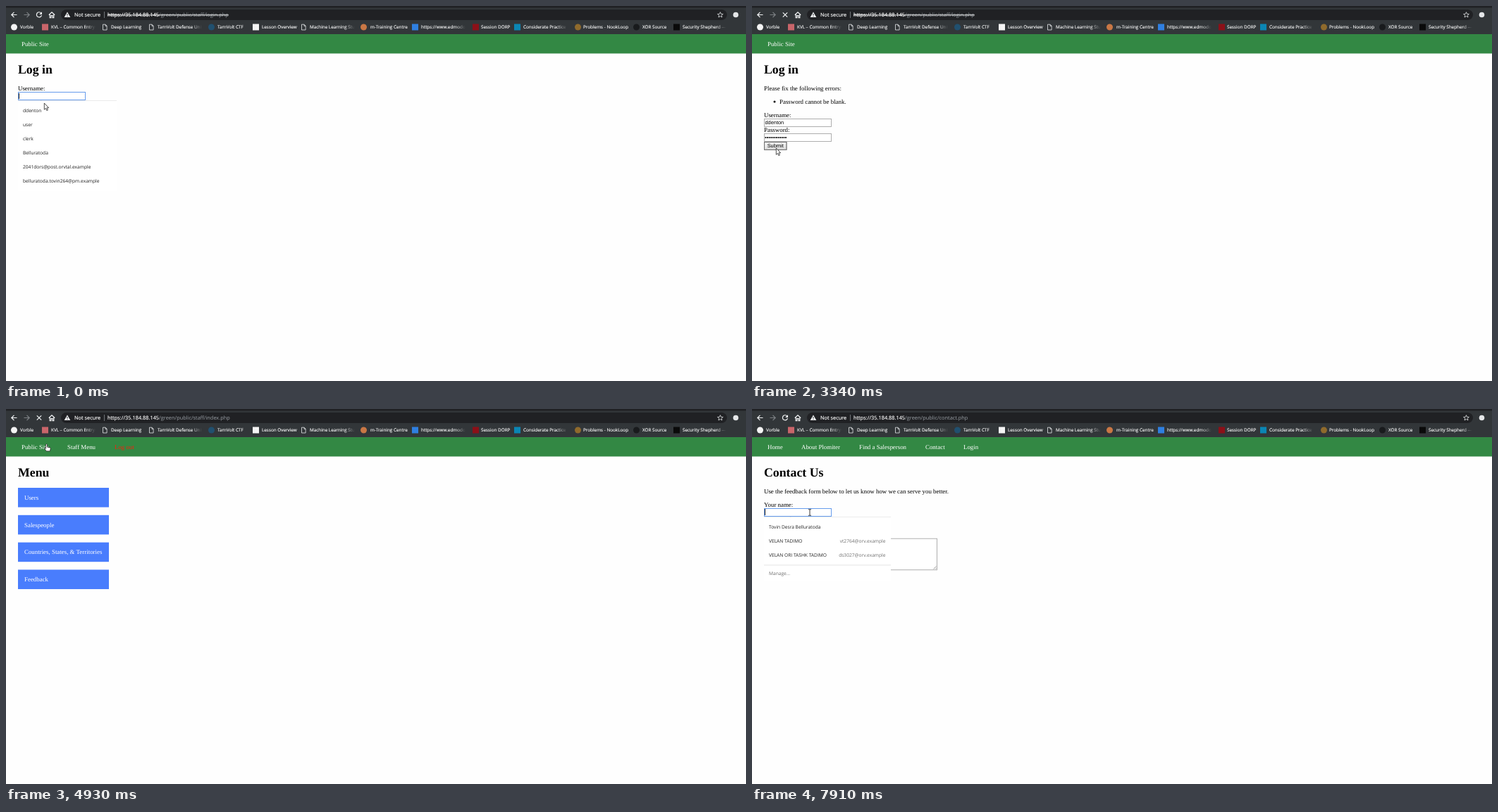
These frames come from a looping animation (1050x533 px, 8000 ms). An HTML page:

```html
<!DOCTYPE html>
<html lang="en">
<head>
<meta charset="utf-8">
<title>Login walkthrough</title>
<style>
  html, body { margin: 0; width: 100%; height: 100%; overflow: hidden; background: #fefefe; }
  svg { display: block; }
  text { white-space: pre; text-rendering: geometricPrecision; }
  .body { font: 8.88px "Liberation Serif", serif; }
  .nav { font: 8.88px "Liberation Serif", serif; fill: #fff; }
  .head { font: bold 17.78px "Liberation Serif", serif; }
  .field { font: 7.4px "Liberation Sans", sans-serif; }
  .mark { font: 6.35px "Open Sans", sans-serif; fill: #fff; stroke: #fff; stroke-width: .12; }
  .bar { font: 7.37px "Open Sans", sans-serif; fill: #fff; stroke: #fff; stroke-width: .15; }
  .path { fill: #9aa0a6; stroke: none; }
  .struck { text-decoration: line-through .6px; }
  .item { font: 6.65px "Open Sans", sans-serif; fill: #222; }
  .soft { fill: #707070; }
  .popup { filter: drop-shadow(0 .9px .6px rgba(0, 0, 0, .32)); }
  .line { fill: none; stroke: #f1f3f4; stroke-width: 1.2; }
  .thin { stroke-width: .75; }
</style>
</head>
<body>
<svg id="stage" width="1050" height="533" viewBox="0 0 1050 533">
  <defs>
    <linearGradient id="fade"><stop stop-color="#323639" stop-opacity="0"/><stop offset="1" stop-color="#323639"/></linearGradient>
    <linearGradient id="btn" x2="0" y2="1"><stop stop-color="#f4f4f4"/><stop offset="1" stop-color="#dcdcdc"/></linearGradient>
  </defs>
</svg>
<script>
const stage = document.getElementById('stage');
const LOOP = 8000, BAR = '#323639';

const text = (cls, x, y, s, more = '') => `<text class="${cls}" x="${x}" y="${y}" ${more}>${s}</text>`;
const rect = (x, y, w, h, fill, more = '') =>
  `<rect x="${x}" y="${y}" width="${w}" height="${h}" fill="${fill}" ${more}/>`;
const group = (id, inner, more = '') => `<g id="${id}" ${more}>${inner}</g>`;
const input = (y, h = 11, w = 95) => rect(17.5, y, w, h, '#fff', 'stroke="#a6a6a6" stroke-width=".9"');
const ring = (id, y) => rect(17.5, y, 95, 11, 'none', `id="${id}" stroke="#659bec"`);
const caret = (id, y, h) => rect(18, y, 1, h, '#222', `id="${id}"`);
const button = y => rect(17.5, y, 31.5, 10.8, 'url(#btn)', 'stroke="#a3a3a3" stroke-width=".9"') +
  text('field', 33.2, y + 7.6, 'Submit', 'text-anchor="middle"');
const nav = list => list.map(([x, s]) => text('nav', x, 57, s)).join('');

// Browser toolbar
function bookmark([shape, color, ix, tx, label, end]) {
  const icon = shape === 'page'
    ? `<path class="line thin" d="M${ix + 1.5} 26.2h3.6l2 2v5.8h-5.600zM${ix + 5} 26.4v2h2"/>`
    : shape === 'dot' ? `<circle cx="${ix + 4.5}" cy="30" r="4.5" fill="${color}"/>`
    : rect(ix, 25.5, 9, 9, color);
  const w = (end || tx + 90) - tx;
  const cover = end ? rect(w - 15, 0, 15, 16, 'url(#fade)') : '';
  return icon + `<svg x="${tx}" y="22" width="${w}" height="16">${text('mark', 0, 10.3, label)}${cover}</svg>`;
}
const bookmarks = [
  ['dot', '#f4f4f4', 7, 20, 'Vorble'],
  ['box', '#c9656a', 51, 64, 'KVL – Common Entryway', 127],
  ['page', '', 136, 149, 'Deep Learning'],
  ['page', '', 202, 215, 'TarnVolt Defense Unit', 278],
  ['dot', '#21506f', 287, 300, 'TarnVolt CTF'],
  ['box', '#f4f4f4', 350, 363, 'Lesson Overview'],
  ['page', '', 418, 431, 'Machine Learning Study', 495],
  ['dot', '#c97745', 503, 517, 'm-Training Centre'],
  ['box', '#2f7fe0', 576, 589, 'https://www.edmodo.com', 652],
  ['box', '#8c1018', 662, 674, 'Session DORP'],
  ['box', '#0b86b4', 721, 734, 'Considerate Practice', 796],
  ['dot', '#8f6a2c', 807, 819, 'Problems - NookLoop'],
  ['dot', '#191b1d', 890, 903, 'XOR Source'],
  ['box', '#0a0a0a', 947, 960, 'Security Shepherd — Guide', 1022],
];
const url = (id, path, cls = '') => text('bar ' + cls, 144, 15.2,
  `https://35.184.88.145<tspan class="path">/green/public/${path}</tspan>`, `id="${id}"`);
const chrome = rect(0, 0, 1050, 40, BAR) + rect(0, 0, 1050, 2.5, '#202124') +
  rect(78, 5, 945, 15, '#202124', 'rx="7.5"') +
  '<path class="line" d="M15.5 12.5H8M11.5 8.8L7.8 12.5l3.7 3.7"/>' +
  '<path class="line" style="stroke:#7c8084" d="M25.5 12.5H33M29.5 8.8l3.7 3.7l-3.7 3.7"/>' +
  group('reload', '<path class="line" d="M49.9 10.2A3.6 3.6 0 1 0 50.5 13.2"/><path fill="#f1f3f4" d="M51 8.2v3.8h-3.8z"/>') +
  group('stop', '<path class="line" d="M43.8 9.3l6.4 6.4M50.2 9.3l-6.4 6.4"/>') +
  '<path class="line" d="M60.8 12.7L65 8.8l4.2 3.9M62.2 12v4.6h1.7v-2.9h2.2v2.9h1.7V12"/>' +
  '<path fill="#f1f3f4" d="M87 8.5l4.3 7.5h-8.6z"/><path stroke="#202124" d="M87 11v2.3M87 14.2v.9"/>' +
  text('bar', 97, 15.2, 'Not secure') + rect(139, 8, .8, 9, '#84888c') +
  url('urlLogin', 'staff/login.php', 'struck') + url('urlMenu', 'staff/index.php') +
  url('urlHome', 'index.php') + url('urlContact', 'contact.php') +
  '<path class="line thin" d="M1013.5 8.7l1.1 2.6 2.8.2-2.1 1.8.7 2.7-2.5-1.5-2.5 1.5.7-2.7-2.1-1.8 2.8-.2z"/>' +
  '<circle cx="1035.5" cy="12.5" r="3.8" fill="#e4e6e8"/>' +
  bookmarks.map(bookmark).join('') + rect(0, 40, 1050, 27.5, '#338844');

// Pages
const dots = Array.from({ length: 12 }, (_, i) =>
  `<circle cx="${19.4 + i * 2.6}" cy="149" r="1.05"/>`).join('');
const login = group('login', nav([[22, 'Public Site']]) + text('head', 17, 95.6, 'Log in') +
  group('errors', text('body', 17, 119.8, 'Please fix the following errors:') +
    '<circle cx="32" cy="136" r="1.5"/>' + text('body', 39, 138.6, 'Password cannot be blank.')) +
  group('form', text('body', 17, 119.8, 'Username:') + input(122.5) +
    text('field', 18.5, 130.2, 'ddenton', 'id="user"') + ring('userRing', 122.5) + caret('userCaret', 124, 8) +
    text('body', 17, 141.3, 'Password:') + input(143.5) + group('dots', dots) +
    ring('passRing', 143.5) + caret('passCaret', 145, 8) + button(155.5) +
    rect(17.5, 155.5, 31.5, 10.8, 'none', 'id="pressed" stroke="#6f6f6f"')) +
  group('logins', rect(17, 134.5, 140, 128.5, '#fff') +
    rect(17, 139, 140, 20, '#ededed', 'id="hover"') +
    ['ddenton', 'user', 'clerk', 'Belluratoda', '2041dors@post.orvtal.example', 'belluratoda.tovin264@pm.example']
      .map((s, i) => text('item', 24, 151.2 + i * 20, s)).join(''), 'class="popup"'));

const menu = group('menu', nav([[22, 'Public Site'], [87, 'Staff Menu']]) +
  text('nav', 154, 57, 'Log out', 'style="fill:#f4200f"') + text('head', 17, 95.6, 'Menu') +
  ['Users', 'Salespeople', 'Countries, States, &amp; Territories', 'Feedback'].map((s, i) =>
    rect(17, 112 + i * 38.8, 129, 27.6, '#497dfd') + text('nav', 26, 128.7 + i * 38.8, s)).join(''));

const publicNav = nav([[22, 'Home'], [70, 'About Plomiter'], [152, 'Find a Salesperson'], [246, 'Contact'], [300, 'Login']]);
const home = group('home', publicNav + text('head', 17, 95.6, 'Welcome to Plomiter!') + [
  'Plomiter is a world-wide industry leader with many award-winning products',
  'which have become well-known household names. Our staff of experts are',
  'dedicated to finding synergies across a wide variety of vertical markets and',
  'integrating technology into everyday life.',
].map((s, i) => text('body', 17, 119.8 + i * 10, s)).join(''));

const person = (y, name, mail) => text('item', 24, y, name) +
  text('item soft', 189.5, y, mail, 'text-anchor="end"');
const contact = group('contact', publicNav + text('head', 17, 95.6, 'Contact Us') +
  text('body', 17, 119.8, 'Use the feedback form below to let us know how we can serve you better.') +
  text('body', 17, 138.6, 'Your name:') + input(141.5) +
  text('body', 17, 160.2, 'Your email:') + input(162.8) +
  text('body', 17, 182, 'Feedback:') + input(184.2, 44.5, 245) +
  '<path stroke="#777" stroke-width=".7" d="M257.5 227.5l4-4M260 227.5l1.7-1.7"/>' + button(231.5) +
  group('people', ring('nameRing', 141.5) + caret('nameCaret', 142, 9) +
    group('names', rect(17, 153.5, 180, 91.5, '#fff') +
      person(170, 'Tovin Desra Belluratoda', '') +
      person(190, 'VELAN TADIMO', 'vt2764@orv.example') +
      person(210, 'VELAN ORI TASHK TADIMO', 'ds3027@orv.example') +
      rect(17, 221.5, 180, .8, '#ddd') + text('item soft', 24, 235.8, 'Manage...'), 'class="popup"')));

const pointers = group('arrow', '<path d="M.3 0v9.3l2.1-1.9 1.5 3.2 1.5-.7-1.5-3.1h2.8z" fill="#fff" stroke="#222" stroke-width=".8"/>') +
  group('hand', '<path d="M-1 1q1-1.4 2 0v3.6l4 .8q.8.3.7 1.4l-.7 3.6H-.3l-2.7-4q.2-1.2 1.3-.4l.7.7z" fill="#fff" stroke="#222" stroke-width=".8"/>') +
  group('beam', '<path d="M-2-4.3h1.5l.5.4.5-.4H2M0-4V4M-2 4.3h1.5l.5-.4.5.4H2" fill="none" stroke="#222" stroke-width=".9"/>');

stage.insertAdjacentHTML('beforeend', chrome + login + menu + home + contact + pointers);

const $ = id => document.getElementById(id);
const show = (id, on) => { $(id).style.display = on ? '' : 'none'; };
const within = (t, ...spans) => spans.some(([a, b]) => t >= a && t < b);

// Bursts of change: start, end, number of steps
const bursts = [
  [0, 0, 1], [90, 880, 10], [1160, 1340, 3], [1520, 1880, 5], [2340, 2340, 1], [2520, 2970, 6],
  [3250, 4040, 10], [4130, 4750, 8], [4930, 5650, 9], [5740, 5920, 3], [6100, 6900, 10],
  [6990, 7170, 3], [7450, 7450, 1], [7630, 7630, 1], [7910, 7910, 1],
];
function snap(t) {
  const [a, b, n] = bursts.filter(s => s[0] <= t).pop();
  if (n === 1) return a;
  const step = (b - a) / (n - 1);
  return a + Math.min(n - 1, Math.floor((t - a) / step + .1)) * step;
}

// Pointer path: time, kind, x, y
const route = [
  [0, 'arrow', 54, 138], [265, 'arrow', 50, 147], [435, 'beam', 50.5, 149.5],
  [1155, 'beam', 50.5, 149.5], [1335, 'beam', 50.5, 170.5], [1515, 'beam', 50.5, 171],
  [1605, 'arrow', 46, 194], [1695, 'beam', 48.5, 188.5], [2605, 'beam', 48.5, 188.5],
  [2690, 'arrow', 42, 195], [2785, 'arrow', 34, 202], [3420, 'arrow', 34, 202], [3590, 'hand', 55, 168],
  [3860, 'arrow', 95, 108], [4035, 'arrow', 119, 72], [4210, 'hand', 114, 57.5],
  [4390, 'arrow', 90, 56], [4560, 'hand', 62, 53], [4745, 'hand', 57.5, 49.5],
  [5010, 'hand', 57.5, 49.5], [5100, 'arrow', 80, 54], [5465, 'arrow', 225, 68],
  [5550, 'hand', 249, 64], [5645, 'hand', 261, 60], [5915, 'hand', 260, 56],
  [6270, 'hand', 260, 56], [6360, 'arrow', 235, 72], [6700, 'beam', 92, 140],
  [6805, 'beam', 83, 147.5], [6895, 'beam', 83, 147.5], [6985, 'beam', 85, 147],
  [7075, 'beam', 79, 149], [7165, 'beam', 83, 147], [7600, 'beam', 83, 147], [7625, 'beam', 82, 147],
];
function movePointer(t) {
  let i = route.length - 1;
  while (route[i][0] > t) i--;
  const [t0, kind, x0, y0] = route[i], [t1, , x1, y1] = route[i + 1] || [t0 + 1, kind, x0, y0];
  const k = Math.min(1, (t - t0) / (t1 - t0));
  for (const id of ['arrow', 'hand', 'beam']) show(id, id === kind);
  $(kind).setAttribute('transform', `translate(${x0 + (x1 - x0) * k} ${y0 + (y1 - y0) * k})`);
}

function render(time) {
  const t = snap(time);
  const page = t < 3510 ? 'Login' : t < 5105 ? 'Menu' : t < 6270 ? 'Home' : 'Contact';
  for (const p of ['Login', 'Menu', 'Home', 'Contact']) {
    show(p.toLowerCase(), p === page);
    show('url' + p, p === page);
  }
  const loading = within(t, [610, 870], [2960, 3600], [4920, 5190], [6090, 6370]);
  show('stop', loading);
  show('reload', !loading);

  const failed = t >= 780;
  show('errors', failed);
  $('form').setAttribute('transform', `translate(0 ${failed ? 38 : 0})`);
  show('logins', t < 430);
  show('hover', within(t, [170, 430]));
  show('user', t >= 430);
  show('userRing', !failed);
  show('userCaret', !failed);
  $('userCaret').setAttribute('x', t < 430 ? 18 : 45.5);
  show('dots', t >= 2515);
  show('passRing', within(t, [1780, 2870]));
  show('passCaret', within(t, [1780, 2335], [2515, 2870]));
  $('passCaret').setAttribute('x', t < 2515 ? 18 : 49.8);
  show('pressed', t >= 2870);

  show('people', t >= 6890);
  show('nameCaret', within(t, [6890, 7450], [7910, LOOP]));
  movePointer(t);
}

function tick() {
  render(performance.now() % LOOP);
  requestAnimationFrame(tick);
}
tick();
</script>
</body>
</html>
```
